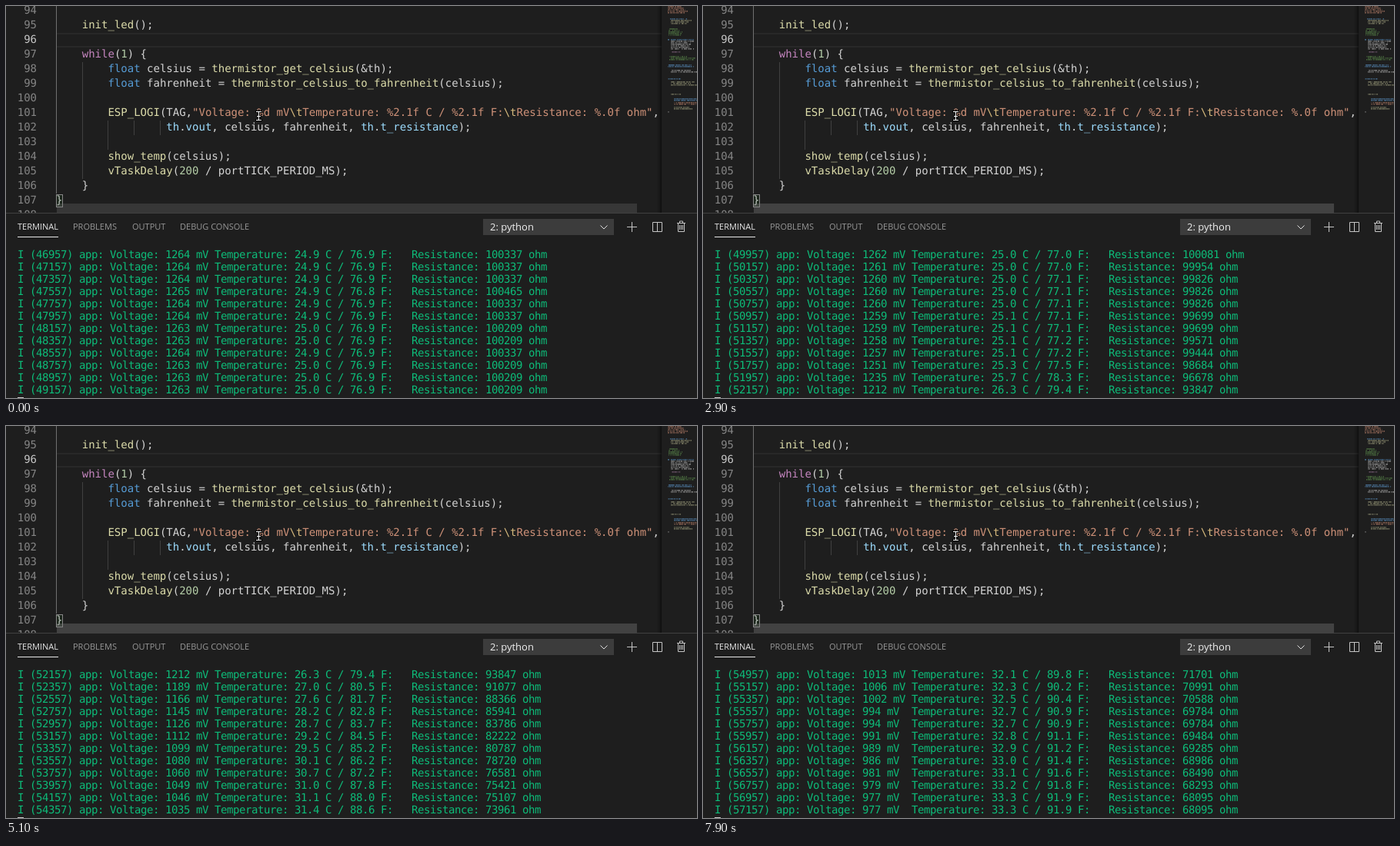
An HTML page with a canvas that plays this animation: 898x510 px, repeating every 8000 ms.

```html
<!DOCTYPE html>
<html lang="en">
<head>
<meta charset="utf-8">
<title>Thermistor log</title>
<style>
html, body { margin: 0; width: 100%; height: 100%; overflow: hidden; background: #1e1e1e; }
#stage { position: relative; width: 898px; height: 510px; overflow: hidden; background: #1e1e1e; }
#stage * { position: absolute; box-sizing: border-box; }
#stage span { position: static; }
.mono { font: 14px "DejaVu Sans Mono", monospace; white-space: pre; text-rendering: geometricPrecision; }
.line { left: 65px; height: 19px; line-height: 19px; color: #d4d4d4; }
.num { left: 0; width: 40px; height: 19px; line-height: 19px; text-align: right; color: #858585; }
.num.on { color: #c6c6c6; }
.guide { width: 1px; background: #404040; }
.fn { color: #dcdcaa; } .ctl { color: #c586c0; } .type { color: #569cd6; }
.str { color: #ce9178; } .esc { color: #d7ba7d; } .var { color: #9cdcfe; } .lit { color: #b5cea8; }
#current { left: 66px; top: 35px; width: 786px; height: 19px; border: solid #282828; border-width: 2px 0; }
#match { left: 65px; top: 245px; width: 9px; height: 17px; border: 1px solid #888; background: rgba(0,100,0,.1); }
#bar { left: 66px; top: 257px; width: 754px; height: 12px; background: rgba(121,121,121,.4); }
#shade { left: 846px; top: 0; width: 6px; height: 269px; box-shadow: #000 -6px 0 6px -6px inset; }
#map { left: 852px; top: 0; background: #1e1e1e; }
#panel { left: 0; top: 269px; width: 898px; height: 241px; background: #1e1e1e; border-top: 1px solid #414141; }
.tab { top: 279px; font: 11px/16px "Open Sans", "Noto Sans", sans-serif; color: #979797; white-space: pre; }
.tab.on { color: #e7e7e7; }
#under { left: 15px; top: 300px; width: 53px; height: 1px; background: #e7e7e7; }
#pick { left: 620px; top: 277px; width: 170px; height: 21px; background: #3c3c3c; color: #f0f0f0; font: 13px/21px "Open Sans", "Noto Sans", sans-serif; padding-left: 9px; white-space: pre; }
#term { left: 15px; top: 316px; line-height: 16px; letter-spacing: -.4287px; color: #0dbc79; }
#caret { left: 15px; top: 509px; width: 8px; height: 16px; border: 1px solid #ccc; }
#icons { left: 0; top: 0; }
</style>
</head>
<body>
<div id="stage">
  <div id="current"></div>
  <div id="code"></div>
  <div id="match"></div>
  <div id="bar"></div>
  <div id="shade"></div>
  <canvas id="map" width="46" height="269"></canvas>
  <div id="panel"></div>
  <div class="tab on" style="left:15px">TERMINAL</div>
  <div class="tab" style="left:87px">PROBLEMS</div>
  <div class="tab" style="left:164px">OUTPUT</div>
  <div class="tab" style="left:226px">DEBUG CONSOLE</div>
  <div id="under"></div>
  <div id="pick">2: python</div>
  <div id="term" class="mono"></div>
  <div id="caret"></div>
  <svg id="icons" width="898" height="510" fill="none" stroke="#c5c5c5">
    <path d="M772.5 285.5l4.5 4.5l4.5-4.5" stroke="#e0e0e0"/>
    <path d="M807 287.5h13M813.5 281v13"/>
    <path d="M840.5 281.5h12v12h-12zM846.5 281v12"/>
    <path d="M872 282.5h11M875.5 282v-2h4v2M873.5 283v10.5h8v-10.5M875.5 285v6M877.5 285v6M879.5 285v6"/>
    <defs><path id="beam" d="M325.5 137.5h6M328.5 138v10M325.5 148.5h6M326.5 143.5h4"/></defs>
    <use href="#beam" stroke="#000" stroke-width="3" stroke-linecap="square"/>
    <use href="#beam" stroke="#fff" stroke-linecap="square"/>
  </svg>
</div>
<script>
const $ = id => document.getElementById(id);
const lineTop = n => 54 + (n - 97) * 19;

function add(cls, text, style) {
  const el = document.createElement('div');
  el.className = cls;
  el.innerHTML = text;
  Object.assign(el.style, style);
  $('code').append(el);
}

// Markup: {class:text}
const paint = s => s.replace(/&/g, '&amp;').replace(/\{(\w+):([^}]*)\}/g, '<span class="$1">$2</span>');

const code = {
  95: '    {fn:init_led}();',
  97: '    {ctl:while}({lit:1}) {',
  98: '        {type:float} celsius = {fn:thermistor_get_celsius}(&th);',
  99: '        {type:float} fahrenheit = {fn:thermistor_celsius_to_fahrenheit}(celsius);',
  101: '        {fn:ESP_LOGI}(TAG,{str:"Voltage: %d mV}{esc:\\t}{str:Temperature: %2.1f C / %2.1f F:}{esc:\\t}{str:Resistance: %.0f ohm"},',
  102: ' '.repeat(17) + '{var:th}.{var:vout}, celsius, fahrenheit, {var:th}.{var:t_resistance});',
  104: '        {fn:show_temp}(celsius);',
  105: '        {fn:vTaskDelay}({lit:200} / portTICK_PERIOD_MS);',
  106: '    }',
  107: '}'
};

function guide(col, from, to, color) {
  add('guide', '', {
    left: Math.round(65 + col * 8.43) + 'px', top: lineTop(from) + 'px',
    height: (to - from + 1) * 19 + 'px', background: color
  });
}
guide(0, 94, 106, '#707070');
guide(4, 98, 105);
guide(8, 102, 103);
guide(12, 102, 102);
guide(16, 102, 102);

for (let n = 94; n <= 108; n++) {
  const top = lineTop(n) + 'px';
  add('mono num' + (n === 96 ? ' on' : ''), n, { top });
  if (code[n]) add('mono line', paint(code[n]), { top });
}

// Overview of the file, block by block: y, rows, x, length, colour
const [grey, rose, rust, green, khaki, blue] =
  ['#9a9a9a', '#8d6b8a', '#a0705e', '#557f47', '#8f8f72', '#4f7ca5'];
const blocks = [
  [1, 5, 8, 22, rust], [17, 1, 8, 30, blue], [19, 3, 12, 24, khaki],
  [30, 5, 9, 16, green], [44, 1, 8, 29, blue], [46, 6, 12, 29, grey],
  [60, 1, 12, 13, rose], [66, 3, 10, 28, green], [77, 2, 8, 32, blue],
  [84, 2, 12, 32, grey], [95, 1, 8, 19, blue], [99, 3, 12, 28, khaki],
  [115, 1, 12, 11, khaki], [121, 2, 16, 27, blue], [126, 2, 16, 30, rust],
  [132, 2, 16, 20, khaki], [138, 1, 8, 2, grey]
];
const ctx = $('map').getContext('2d');
let seed = 7;
const rand = () => (seed = seed * 16807 % 2147483647) / 2147483647;
for (const [y, rows, x, len, color] of blocks) {
  ctx.fillStyle = color;
  for (let r = 0; r < rows; r++) {
    const end = len * (.8 + rand() * .4);
    for (let i = 0; i < end; i++) {
      ctx.globalAlpha = rand() < .14 ? 0 : .3 + rand() * .5;
      ctx.fillRect(x + i, y + r * 2 - 1, 1, 1);
      ctx.globalAlpha *= .6;
      ctx.fillRect(x + i, y + r * 2, 1, 1);
    }
  }
}

// One sensor reading every 200 ms, in mV
const volts = [
  1264, 1264, 1264, 1265, 1264, 1264, 1263, 1263, 1264, 1263, 1263, 1263,
  1262, 1264, 1261, 1262, 1261, 1260, 1260, 1260, 1259, 1259, 1258, 1257,
  1251, 1235, 1212, 1189, 1166, 1145, 1126, 1112, 1099, 1080, 1060, 1049,
  1046, 1035, 1025, 1019, 1013, 1006, 1002, 994, 994, 991, 989, 986,
  981, 979, 977, 977
];
const log = volts.map((mv, i) => {
  const ohm = 164000 * mv / (3330 - mv);
  const c = 1 / (1 / 298.15 + Math.log(ohm / 1e5) / 4250) - 273.15;
  const f = c * 1.8 + 32;
  const head = `I (${46957 + i * 200}) app: Voltage: ${mv} mV`.padEnd(32);
  const temp = `Temperature: ${c.toFixed(1)} C / ${f.toFixed(1)} F:`.padEnd(32);
  return head + temp + `Resistance: ${ohm.toFixed(0)} ohm`;
});

// The screen skips one refresh per second, so two lines then arrive together
function linesAt(t) {
  if (t < 100) return 0;
  const n = Math.floor((t - 100) / 200);
  return n > 5 && n % 5 === 1 ? n : n + 1;
}

let shown = -1;
function draw() {
  const n = linesAt(performance.now() % 8000);
  if (n !== shown) {
    shown = n;
    $('term').textContent = log.slice(n, n + 12).join('\n');
    $('bar').style.opacity = n ? 1 : .68;
  }
  requestAnimationFrame(draw);
}
draw();
</script>
</body>
</html>
```
